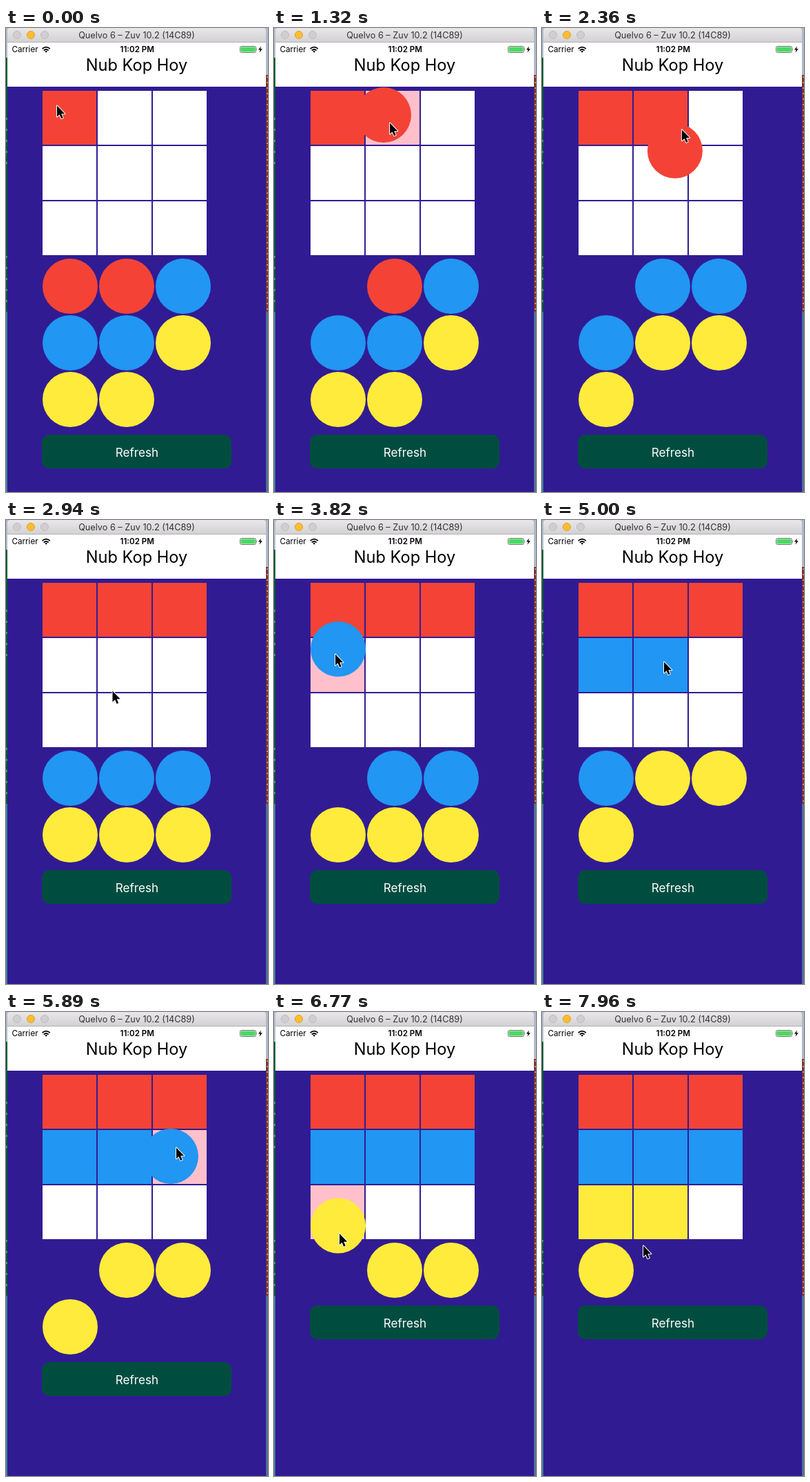
These frames come from a looping animation (380x672 px, 8000 ms). An HTML page:

```html
<!DOCTYPE html>
<html lang="en">
<head>
<meta charset="utf-8">
<title>Tile game</title>
<style>
  html, body { margin: 0; width: 100%; height: 100%; overflow: hidden; background: #311b92; }
  svg { display: block; font-family: Inter, Roboto, sans-serif; }
  text { text-anchor: middle; }
</style>
</head>
<body>
<svg width="380" height="672" viewBox="0 0 380 672">
  <defs>
    <linearGradient id="bar" x2="0" y2="1">
      <stop stop-color="#e9e7e9"/><stop offset="1" stop-color="#d2d0d2"/>
    </linearGradient>
  </defs>

  <!-- desktop slivers beside the window -->
  <rect width="380" height="672" fill="#aeb9cb"/>
  <path d="M0 43h2v368h-2z" fill="#075a35"/>
  <path d="M1 130v80M1 330v70" stroke="#9fc0ac" stroke-dasharray="3 13"/>
  <path d="M0 411h2v261h-2z" fill="#427c9d"/>
  <path d="M377 68h3v343h-3z" fill="#7b3230"/>
  <path d="M379 70v340" stroke="#b58a82" stroke-width="2" stroke-dasharray="2 6"/>
  <path d="M377 411h3v261h-3z" fill="#50718f"/>

  <!-- window -->
  <rect x="2" y="20" width="375" height="652" fill="#311b92"/>
  <rect x="2" y="21" width="375" height="64" fill="#fff"/>
  <path d="M2 21V4q0-4 4-4h367q4 0 4 4v17z" fill="url(#bar)"/>
  <path d="M2 20.5h375" stroke="#b3b1b3"/>
  <g fill="#d0ced0" stroke="#bcbabc">
    <circle cx="16" cy="10" r="5.5"/>
    <circle cx="36" cy="10" r="5.5" fill="#fdbd2f" stroke="#e0a02a"/>
    <circle cx="56" cy="10" r="5.5"/>
  </g>
  <text x="189.5" y="15" font-size="12.7" fill="#343234">Quelvo 6 – Zuv 10.2 (14C89)</text>

  <!-- status bar -->
  <text x="27.5" y="35.3" font-size="11.7">Carrier</text>
  <g fill="none" stroke="#000" stroke-width="1.8">
    <path d="M52.6 30.2q5.6-5.2 11.2 0M54.8 32.5q3.4-3 6.8 0"/>
    <path d="M56.4 33.7q1.8-1.5 3.6 0l-1.8 2z" fill="#000" stroke="none"/>
  </g>
  <text x="190.3" y="35.3" font-size="11.6" font-weight="600">11:02 PM</text>
  <rect x="339.5" y="26.5" width="23" height="9" rx="2" fill="#fff" stroke="#777"/>
  <rect x="340.5" y="27.5" width="21" height="7" rx="1" fill="#4cd964"/>
  <path d="M363.5 29.3q1.6 1.7 0 3.4z" fill="#777"/>
  <path d="M370 26.5l-4 5h2.6l-1.2 4.2 4.4-5.5h-2.7z"/>
  <text x="189.5" y="61.5" font-size="23.6">Nub Kop Hoy</text>

  <g id="cells"></g>
  <g id="discs"></g>
  <g id="button">
    <rect x="52" width="275" height="49" rx="11" fill="#004d40"/>
    <text x="189.9" y="31.5" font-size="17.1" fill="#fff">Refresh</text>
  </g>
  <circle id="held" r="40"/>
  <path id="cursor" d="M0 0V16L3.6 12.8L6.2 18.7L8.7 17.6L6.2 11.8H11.3Z"
        stroke="#fff" stroke-width="2" stroke-linejoin="round" paint-order="stroke"/>
</svg>

<script>
const LOOP = 8000, STEP = 147.25, COLORS = ['#f44336', '#2196f3', '#ffeb3b'];
const START = [74, 112], REST = { pick: 50, from: [147, 338] };

// Each drag takes the first disc to the next free cell.
const drags = [
  { drop: 6, from: [102, 385], to: [168, 137] },
  { drop: 14, from: [103, 343], to: [220, 113] },
  { drop: 23, from: [89, 381], to: [89, 194] },
  { drop: 30, from: [90, 391], to: [177, 205] },
  { drop: 37, from: [101, 361], to: [247, 196] },
  { drop: 44, from: [95, 385], to: [95, 299] },
  { drop: 49, from: [102, 385], to: [160, 305] }
];
// A little over half the time between two drops is spent dragging.
drags.forEach((d, i) => {
  const gap = i ? d.drop - drags[i - 1].drop : 8;
  d.pick = d.drop - Math.ceil(gap * 0.55);
});

const $ = id => document.getElementById(id);
const colorOf = piece => COLORS[Math.floor(piece / 3)];
const place = (el, x, y) => el.setAttribute('transform', `translate(${x} ${y})`);
const show = (el, on) => el.setAttribute('visibility', on ? 'visible' : 'hidden');

function add(parent, tag, attrs) {
  const el = document.createElementNS('http://www.w3.org/2000/svg', tag);
  for (const name in attrs) el.setAttribute(name, attrs[name]);
  return parent.appendChild(el);
}

const cells = [], discs = [];
for (let i = 0; i < 9; i++) {
  const col = i % 3, row = Math.floor(i / 3);
  cells.push(add($('cells'), 'rect', { x: 53 + 80 * col, y: 91 + 80 * row, width: 78, height: 78 }));
  discs.push(add($('discs'), 'circle', { cx: 93 + 82 * col, cy: 374 + 82 * row, r: 40 }));
}

// The screen updates in discrete steps, after a pause at the start.
const stepAt = t => t < 290 ? 0 : Math.max(1, 2 + Math.floor((t - 872) / STEP));

function ease(a, b, p) {
  const e = (1 - Math.cos(Math.PI * Math.min(1, p))) / 2;
  return a.map((v, i) => v + (b[i] - v) * e);
}

// A drag arrives one step before its drop; then the cursor goes to the next disc.
function cursorAt(step) {
  const i = drags.findLastIndex(d => d.pick <= step);
  if (i < 0) return START;
  const { pick, drop, from, to } = drags[i];
  if (step < drop) return ease(from, to, (step - pick) / (drop - 1 - pick));
  const next = drags[i + 1] || REST;
  return ease(to, next.from, (step - drop) / (next.pick - drop));
}

function cellUnder(x, y) {
  const col = Math.floor((x - 53) / 80), row = Math.floor((y - 91) / 80);
  return col >= 0 && col < 3 && row >= 0 && row < 3 ? row * 3 + col : -1;
}

function draw(step) {
  const [x, y] = cursorAt(step);
  const placed = 1 + drags.filter(d => d.drop <= step).length;
  const drag = drags.find(d => d.pick <= step && step < d.drop);
  const hover = drag ? cellUnder(x, y) : -1;

  cells.forEach((cell, i) =>
    cell.setAttribute('fill', i < placed ? colorOf(i) : i === hover ? '#ffc0cb' : '#fff'));
  discs.forEach((disc, i) => {
    const piece = placed + i;
    show(disc, piece < 9 && !(drag && i === 0));
    if (piece < 9) disc.setAttribute('fill', colorOf(piece));
  });

  show($('held'), drag);
  if (drag) {
    $('held').setAttribute('fill', colorOf(placed));
    place($('held'), 93 + x - drag.from[0], 374 + y - drag.from[1]);
  }
  place($('button'), 0, 343 + 82 * Math.ceil((9 - placed) / 3));
  place($('cursor'), x, y + 0.5);
}

const begin = performance.now();
let last = -1;
function tick() {
  const step = stepAt((performance.now() - begin) % LOOP);
  if (step !== last) draw(last = step);
  requestAnimationFrame(tick);
}
tick();
</script>
</body>
</html>
```
